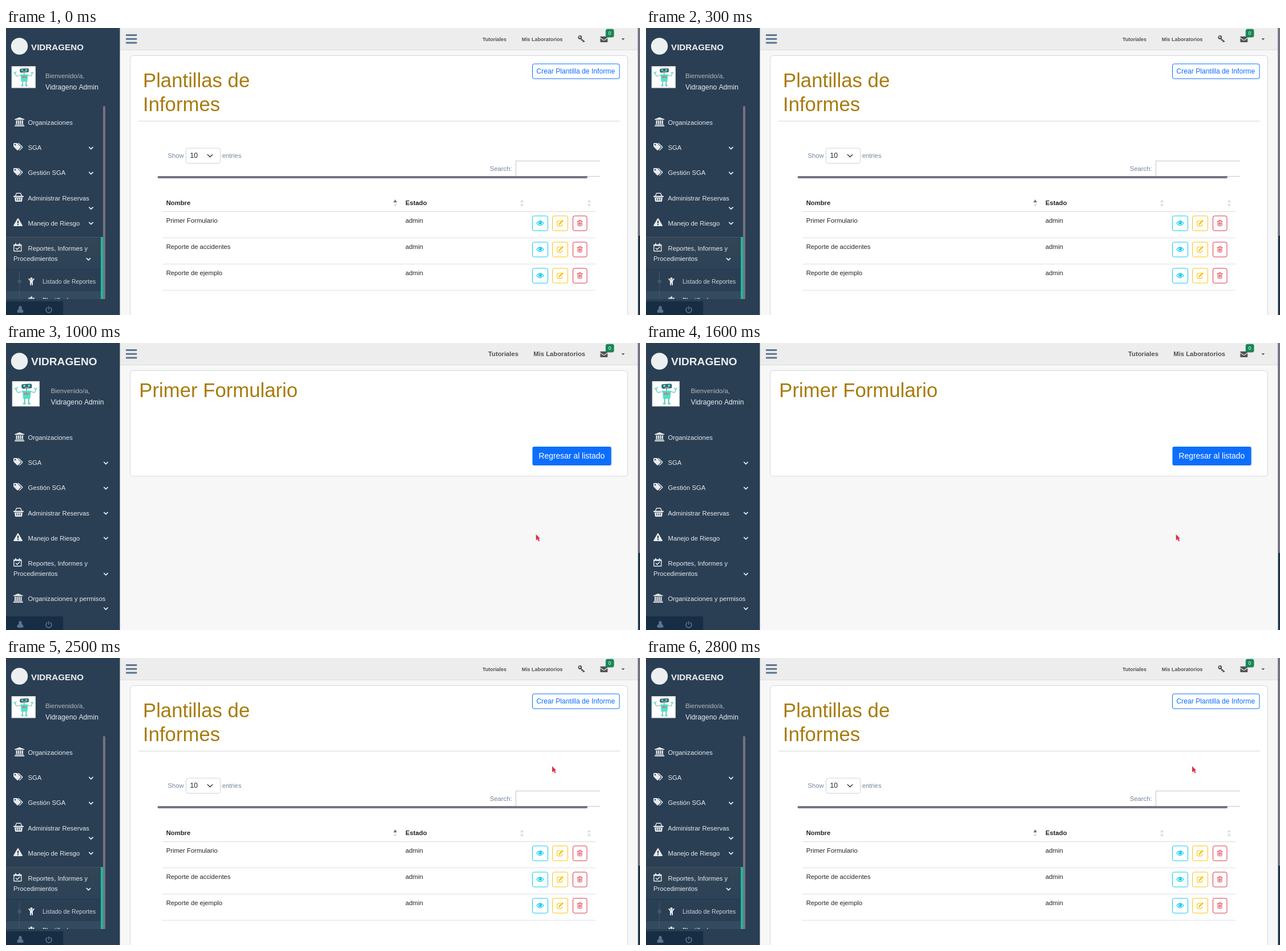
Recreate the animation shown at these times as an HTML page with a canvas. Size 1111 px wide and 504 px high, loop 3000 ms.

```html
<!DOCTYPE html>
<html lang="es">
<head>
<meta charset="utf-8">
<title>Plantillas de Informes</title>
<style>
html, body { margin: 0; width: 100%; height: 100%; overflow: hidden; background: #f7f7f7; }
canvas { display: block; width: 1111px; height: 504px; }
</style>
</head>
<body>
<canvas id="stage"></canvas>
<script>
const W = 1111, H = 504, LOOP = 3000;
const ZOOM = 0.868; // the page is shown at this scale of its CSS sizes
const FONT = '"Liberation Sans", Arial, sans-serif';
const NAVY = '#2a3f54', LIGHT = '#e7e9eb', INK = '#212529', MUTED = '#73879c';
const GOLD = '#a87b0c', BLUE = '#0d6efd', THUMB = '#757385', STEEL = '#5a738e';

const canvas = document.getElementById('stage');
const ratio = window.devicePixelRatio || 1;
canvas.width = Math.round(W * ratio);
canvas.height = Math.round(H * ratio);
const c = canvas.getContext('2d');

function text(s, x, y, size, color, weight = '', align = 'left') {
  c.font = `${weight} ${(size * ZOOM).toFixed(2)}px ${FONT}`;
  c.fillStyle = color;
  c.textAlign = align;
  c.fillText(s, x, y);
}

function rect(x, y, w, h, color) {
  c.fillStyle = color;
  c.fillRect(x, y, w, h);
}

function box(x, y, w, h, r, fill, line) {
  c.beginPath();
  c.roundRect(x, y, w, h, r);
  if (fill) { c.fillStyle = fill; c.fill(); }
  if (line) { c.strokeStyle = line; c.lineWidth = 1; c.stroke(); }
}

function disc(x, y, r, color) {
  c.beginPath();
  c.arc(x, y, r, 0, Math.PI * 2);
  c.fillStyle = color;
  c.fill();
}

function shape(d, x, y, color) {
  c.save();
  c.translate(x, y);
  c.fillStyle = color;
  c.fill(new Path2D(d), 'evenodd');
  c.restore();
}

function line(d, x, y, color, width) {
  c.save();
  c.translate(x, y);
  c.strokeStyle = color;
  c.lineWidth = width;
  c.lineCap = c.lineJoin = 'round';
  c.stroke(new Path2D(d));
  c.restore();
}

const ICON = {
  bank: 'M8.5 0L17 3.4V4.6H0V3.4ZM2.3 5.6H4.6V11.9H2.3ZM5.7 5.6H8V11.9H5.7ZM9.1 5.6H11.4V11.9H9.1ZM12.5 5.6H14.8V11.9H12.5ZM1.2 12.2H15.8V13.5H1.2ZM0 14.3H17V16H0Z',
  tags: 'M0 1.3Q0 0 1.3 0H5.4Q6.4 0 7.2 .7L12.6 6.2Q13.5 7.1 12.6 8L8.2 12.6Q7.3 13.4 6.4 12.6L.8 7Q0 6 0 5ZM3 1.7A1.3 1.3 0 1 0 3 4.3A1.3 1.3 0 1 0 3 1.7ZM7.3 0H8.6Q9.5 .1 10.2 .7L16 6.3Q17 7.2 16 8.2L11.5 12.8Q10.6 13.5 9.7 12.7L14 8.5Q14.8 7.3 14 6.3Z',
  basket: 'M0 6Q0 5.3 1 5.3H17Q18 5.3 18 6V6.8Q18 7.5 17 7.5H1Q0 7.5 0 6.8ZM2 8.3H16L15.2 14.3Q15 15.5 14 15.5H4Q3 15.5 2.8 14.3ZM5 9.6L5.3 13.6H6.4L6.1 9.6ZM8.4 9.6V13.6H9.6V9.6ZM11.9 9.6L11.6 13.6H12.7L13 9.6Z',
  warning: 'M8 0Q8.6 0 9 .7L15.8 12.4Q16.4 14 15 14H1Q-.4 14 .2 12.4L7 .7Q7.4 0 8 0ZM6.8 4.6L7.1 9.2H8.9L9.2 4.6ZM7 10.2V12.2H9V10.2Z',
  child: 'M5.5 0A2.2 2.2 0 1 1 5.4 0ZM.3 2.2Q1 1.3 1.8 2L4 4.6H7L9.2 2Q10 1.3 10.7 2.2Q11 2.8 10.6 3.3L8 6.5V13Q8 14 7 14T6 13V10H5V13Q5 14 4 14T3 13V6.5L.4 3.3Q0 2.8 .3 2.2Z',
  mail: 'M0 1.2Q0 0 1.2 0H11.8Q13 0 13 1.2V1.8L7.4 5.8Q6.5 6.4 5.6 5.8L0 1.8ZM0 3.2L5 6.8Q6.5 7.7 8 6.8L13 3.2V9Q13 10.2 11.8 10.2H1.2Q0 10.2 0 9Z',
  user: 'M5.5 0A3 3.4 0 0 1 7.8 5.4Q11 6.4 11 10Q11 12 9.3 12H1.7Q0 12 0 10Q0 6.4 3.2 5.4A3 3.4 0 0 1 5.5 0Z',
  key: 'M0 3.4A3.4 3.4 0 1 1 6 5.5L12 10.6L10.8 12L9.8 11.2L8.7 12.2L7.6 11.1L8.4 10L7.2 9L6.2 10L5.2 9L6 7.9L4.9 6.7A3.4 3.4 0 0 1 0 3.4ZM3.1 1.7A1.4 1.4 0 1 0 3.2 1.7Z',
  arrow: 'M0 0L7.4 7.4L4.6 7.6L6.6 11.4L4.7 12.3L2.8 8.6L0 10.8Z'
};

const chevron = (x, y) => line('M-3.2 -1.6L0 1.6L3.2 -1.6', x, y, LIGHT, 1.7);

function calendar(x, y) {
  line('M.8 2.6H13.8V13.8H.8ZM.8 4H13.8', x, y, LIGHT, 1.4);
  line('M4 .8V3M10.6 .8V3', x, y, LIGHT, 2);
  line('M4.4 8.8L6.6 11L10.6 6.8', x, y, LIGHT, 1.6);
}

function avatar(x, y, w, h) {
  const teal = '#4fe3c4', dark = '#3a6670';
  rect(x, y, w, h, '#d5dade');
  rect(x + 1, y + 1, w - 2, h - 2, '#fff');
  c.save();
  c.translate(x, y);
  c.scale(w / 48, h / 44);
  line('M19 18L10 20L7 15M32 18L39 20L41 15', 0, 0, '#7fb9b5', 1.3);
  line('M5 12L7 15L9 11M39 12L41 15L43 12', 0, 0, teal, 1.7);
  line('M25 13V17M22 30V38M29 30V38', 0, 0, '#6f9a9c', 1.5);
  c.save();
  c.rotate(-0.05);
  box(16, 6, 18, 8, 2.5, dark);
  disc(21, 9.3, 2, teal);
  disc(29, 9.3, 2, teal);
  rect(22, 12, 7, .9, '#c7d7d9');
  c.restore();
  shape('M18 16.5H33L31.5 31H19.5Z', 0, 0, teal);
  box(20.5, 19.5, 10, 4.5, 1, '#93a5ad');
  rect(22, 21, 4, 1.5, '#ef6576');
  box(19, 37.5, 5, 3, 1.3, teal);
  box(27, 37.5, 5, 3, 1.3, teal);
  c.restore();
}

function sidebar(list) {
  rect(0, 0, 199.6, H, NAVY);
  disc(23.5, 32, 14.7, '#ecf0f1');
  text('VIDRAGENO', 44, 39, list ? 17.5 : 22, '#ecf0f1', 'bold');
  if (list) avatar(9.6, 67, 42.4, 38.5); else avatar(10.6, 67, 48.4, 44.5);
  const nameX = list ? 69 : 78.5;
  text('Bienvenido/a,', nameX, 88, 13, '#bab8b8');
  text('Vidrageno Admin', nameX, 108, 14, '#ecf0f1');

  if (list) {
    const g = c.createLinearGradient(0, 367, 0, 424);
    g.addColorStop(0, '#334556');
    g.addColorStop(1, '#2c4257');
    rect(0, 367, 170, 57, g);
    rect(0, 367, 166, 1, '#45586a');
    rect(0, 423, 166, 1, '#22364a');
    rect(0, 462, 166, 14, '#344a5e');
    rect(23, 428, 1, 48, '#425668');
    disc(23.5, 445, 3.6, '#425668');
    rect(166, 367, 4, 109, '#1abb9c');
    box(170, 137, 4, 339, [2, 2, 0, 0], THUMB);
  }

  const arrowX = list ? 149 : 175;
  shape(ICON.bank, 15.2, 156.7, LIGHT);
  text('Organizaciones', 38.5, 170, 13, LIGHT);
  shape(ICON.tags, 13, 202, LIGHT);
  text('SGA', 38.5, 214, 13, LIGHT);
  chevron(arrowX, 211);
  shape(ICON.tags, 13, 246, LIGHT);
  text('Gestión SGA', 38.5, 258, 13, LIGHT);
  chevron(arrowX, 255);
  shape(ICON.basket, 13, 289.5, LIGHT);
  line('M3.6 5.2L5.4 .8H12.6L14.4 5.2', 13, 289.5, LIGHT, 1.4);
  text('Administrar Reservas', 38.3, 303, 13, LIGHT);
  chevron(arrowX, list ? 316.5 : 299);
  shape(ICON.warning, 13, 334, LIGHT);
  text('Manejo de Riesgo', 38.5, 347, 13, LIGHT);
  chevron(arrowX, 343);
  calendar(13, 378);
  text('Reportes, Informes y', 38.5, 391, 13, LIGHT);
  text('Procedimientos', 13, 409, 13, LIGHT);
  chevron(list ? 144.5 : 175, 406);

  if (list) {
    shape(ICON.child, 39, 438, LIGHT);
    text('Listado de Reportes', 64, 449, 12, '#cfd4d8');
    c.save();
    c.beginPath();
    c.rect(0, 462, 166, 14);
    c.clip();
    shape(ICON.child, 39, 471.5, LIGHT);
    text('Plantilla de', 64, 482, 12, '#fff');
    c.restore();
  } else {
    shape(ICON.bank, 12.8, 440, LIGHT);
    text('Organizaciones y permisos', 38.5, 453, 13, LIGHT);
    chevron(175, 466.5);
  }

  rect(0, 480, 100, 24, '#172d44');
  shape(ICON.user, 19.5, 488, STEEL);
  line('M-3 -3.4A4.9 4.9 0 1 0 3 -3.4M0 -5.2V-.6', 75, 494.5, STEEL, 1.7);
}

function topBar(list) {
  const ink = '#515356';
  rect(199, 0, 909, 38, '#ededed');
  rect(199, 38, 909, 1, '#d9dcdf');
  for (let i = 0; i < 3; i++) box(210, 11 + i * 6.7, 19.5, 3, 1, STEEL);
  const size = list ? 10.3 : 13;
  text('Tutoriales', list ? 835 : 845, 23, size, ink, 'bold');
  text('Mis Laboratorios', list ? 903.7 : 924.3, 23, size, ink, 'bold');
  if (list) shape(ICON.key, 1002.5, 13, ink);
  shape(ICON.mail, 1041.3, 14.8, ink);
  box(1050.8, 1.7, 14.7, 14.8, 3.5, '#198754');
  text('0', 1058, 12.4, 10, '#fff', '', 'center');
  shape('M0 0H6L3 3Z', 1078.3, 18.2, ink);
}

function pageBar(end) {
  rect(1107.5, 0, 3.5, H, '#1f3347');
  box(1107.5, 0, 3.5, end, [0, 0, 2, 2], THUMB);
}

function sorter(x, up) {
  shape('M0 0L3 5.2L-3 5.2Z', x, 301, up);
  shape('M-3 0H3L0 5.2Z', x, 309.3, '#dcdde0');
}

function rowButtons(y) {
  const cyan = '#0dcaf0', amber = '#ffc107', red = '#dc3545';
  box(922.5, y + .5, 27, 26, 3, '#fff', cyan);
  line('M-6 0Q0 -8 6 0Q0 8 -6 0Z', 936, y + 13.2, cyan, 1.1);
  disc(936, y + 12.6, 3, cyan);
  disc(935, y + 11.6, .9, '#fff');
  box(957.5, y + .5, 27, 26, 3, '#fff', amber);
  line('M2 -4.2H-3.8Q-5.3 -4.2 -5.3 -2.8V3.2Q-5.3 4.7 -3.8 4.7H2.2Q3.7 4.7 3.7 3.2V1.4', 971, y + 13.4, amber, 1.1);
  line('M-1.5 1.6L4.4 -4.3', 971, y + 13.4, amber, 2.6);
  box(993.5, y + .5, 24.5, 26, 3, '#fff', red);
  line('M-4.6 -3.2H4.6M-1.8 -3.4L-1.2 -5H1.2L1.8 -3.4M-3.5 -3V3.7Q-3.5 5 -2.4 5H2.4Q3.5 5 3.5 3.7V-3M-1.5 -1V3M0 -1V3M1.5 -1V3', 1005.5, y + 13, red, .9);
}

function listPage() {
  box(217.5, 48.5, 872, 480, 5, '#fff', '#d3d5d8');
  text('Plantillas de', 240, 104, 40, GOLD);
  text('Informes', 240, 146, 40, GOLD);
  box(922.5, 63, 152.5, 26, 3, '#fff', BLUE);
  text('Crear Plantilla de Informe', 929.5, 80, 14, BLUE);
  rect(232, 163, 843, 1, '#d4d6d8');

  text('Show', 283.5, 228, 13, MUTED);
  box(315.5, 211, 60, 26.5, 3, '#fff', '#ced4da');
  text('10', 322.5, 228, 14, INK);
  line('M-4.3 -2.2L0 2.2L4.3 -2.2', 357.5, 224.4, '#343a40', 1.4);
  text('entries', 378.7, 228, 13, MUTED);
  text('Search:', 847.7, 251, 13, MUTED);
  rect(893, 233, 148.5, 1, '#c4c6c8');
  rect(893, 233, 1, 28, '#c4c6c8');
  rect(893, 260, 148.5, 1, '#c4c6c8');
  box(265.5, 260, 753.5, 4, 2, THUMB);

  text('Nombre', 280.7, 311, 13, INK, 'bold');
  text('Estado', 700, 311, 13, INK, 'bold');
  sorter(682, '#6b6d70');
  sorter(904, '#dcdde0');
  sorter(1022, '#dcdde0');
  rect(274, 322, 759, 1, '#d6d8da');
  ['Primer Formulario', 'Reporte de accidentes', 'Reporte de ejemplo'].forEach((name, i) => {
    const y = 322 + i * 46;
    text(name, 280.7, y + 20, 13, INK);
    text('admin', 700, y + 20, 13, INK);
    rowButtons(y + 7.5);
    rect(274, y + 46, 759, 1, '#dee0e2');
  });
}

function formPage(hover) {
  box(217.5, 48.5, 872, 185.5, 5, '#fff', '#d3d5d8');
  text('Primer Formulario', 233.3, 95, 40, GOLD);
  box(922.5, 182, 138.2, 33, 3, hover ? '#0b5ed7' : BLUE);
  text('Regresar al listado', 933.5, 203, 16, '#fff');
}

// Each scene holds until its end time, then cuts to the next.
const scenes = [
  { end: 500, list: true, bar: 365 },
  { end: 1000, list: true, bar: 365, at: [928.7, 336] },
  { end: 2000, bar: 369, at: [928.7, 336] },
  { end: 2500, bar: 364, at: [957, 190], hover: true },
  { end: LOOP, list: true, bar: 365, at: [957, 190] }
];

function draw() {
  const t = performance.now() % LOOP;
  const s = scenes.find(k => t < k.end);
  c.setTransform(ratio, 0, 0, ratio, 0, 0);
  rect(0, 0, W, H, '#f7f7f7');
  if (s.list) listPage(); else formPage(s.hover);
  topBar(s.list);
  sidebar(s.list);
  pageBar(s.bar);
  if (s.at) shape(ICON.arrow, s.at[0], s.at[1], '#dc3045');
  requestAnimationFrame(draw);
}
draw();
</script>
</body>
</html>
```
